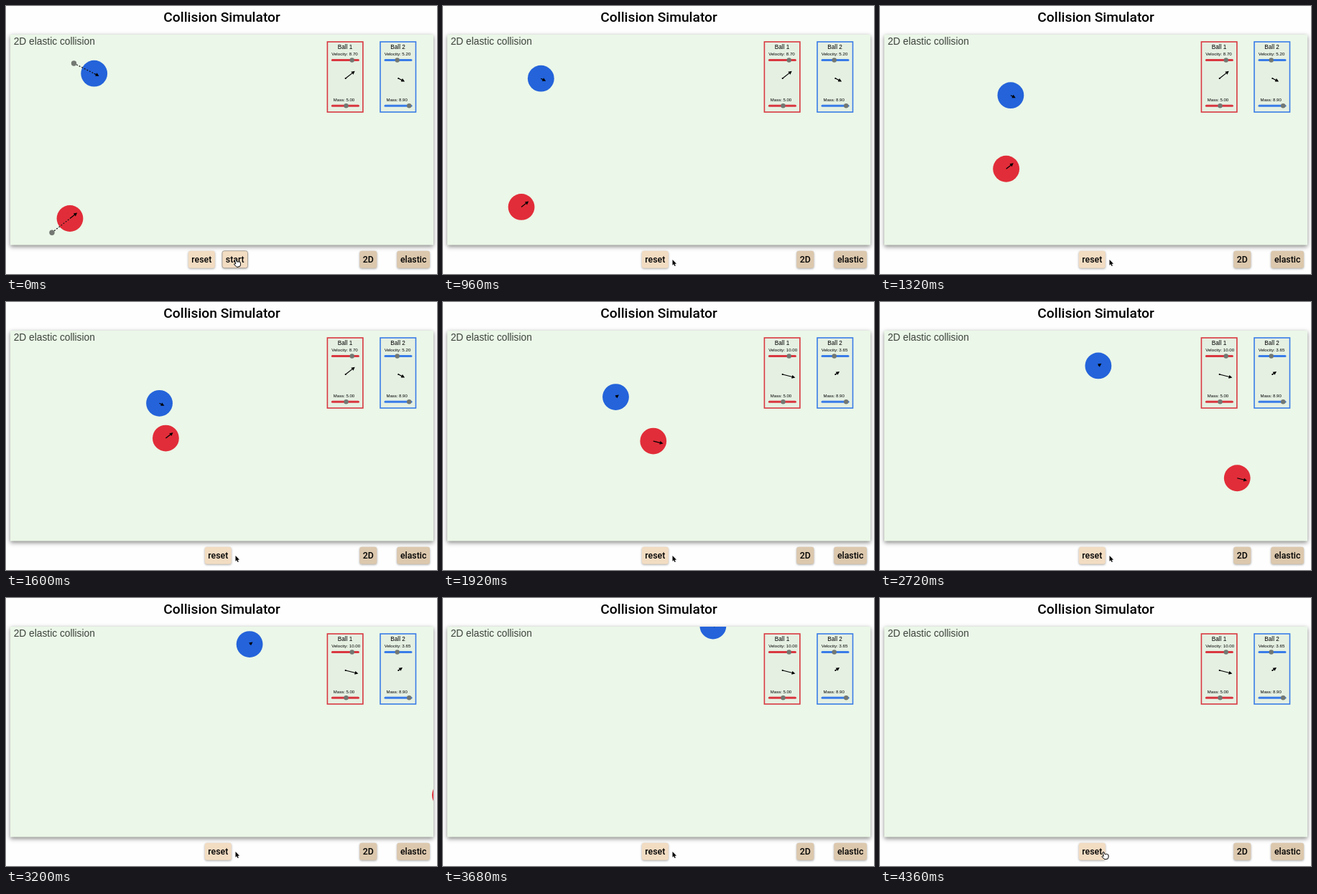
An HTML page with a canvas that plays this animation: 600 px wide and 374 px high, repeating every 4400 ms.

```html
<!DOCTYPE html>
<html lang="en">
<head>
<meta charset="utf-8">
<title>Collision Simulator</title>
<style>
html, body { margin: 0; width: 100%; height: 100%; overflow: hidden; background: #fefefe; }
canvas { display: block; }
</style>
</head>
<body>
<canvas id="view" width="600" height="374"></canvas>
<script>
const ctx = document.getElementById('view').getContext('2d');
const LOOP = 4400, START = 853, HIT = 1680, R = 18.4;
const ARIAL = '"Liberation Sans", Arial, sans-serif';
const ROBOTO = 'Roboto, sans-serif';
const RED = '#e12d39', BLUE = '#2463da', GRAY = '#737873';

// time, red x, red y, blue x, blue y
const path = [
  [START, 89, 296.5, 122.7, 94.2],
  [960, 108.9, 280.6, 136.2, 101.1],
  [1320, 175.5, 227.4, 181.8, 124.6],
  [HIT, 235.6, 179.6, 222.5, 146],
  [1920, 292.5, 194, 240.4, 132.6],
  [2720, 497, 245.7, 303.8, 89],
  [3200, 611.2, 275, 339, 64.6],
  [LOOP, 897, 347, 431, 1]
];

function positions(t) {
  if (t <= START) return path[0].slice(1);
  const i = path.findIndex(p => p[0] > t);
  const a = path[i - 1], b = path[i];
  const k = (t - a[0]) / (b[0] - a[0]);
  return a.slice(1).map((v, j) => v + (b[j + 1] - v) * k);
}

function text(s, x, y, font, color = '#000', align = 'center') {
  ctx.font = font;
  ctx.fillStyle = color;
  ctx.textAlign = align;
  ctx.fillText(s, x, y);
}

function disc(x, y, r, color) {
  ctx.fillStyle = color;
  ctx.beginPath();
  ctx.arc(x, y, r, 0, 7);
  ctx.fill();
}

function line(x1, y1, x2, y2, color, width, dash = []) {
  ctx.strokeStyle = color;
  ctx.lineWidth = width;
  ctx.setLineDash(dash);
  ctx.beginPath();
  ctx.moveTo(x1, y1);
  ctx.lineTo(x2, y2);
  ctx.stroke();
  ctx.setLineDash([]);
}

function shadow(color, blur, y) {
  ctx.shadowColor = color;
  ctx.shadowBlur = blur;
  ctx.shadowOffsetY = y;
}

function arrow(x, y, [dx, dy], scale) {
  const len = Math.hypot(dx, dy) * scale;
  ctx.save();
  ctx.translate(x, y);
  ctx.rotate(Math.atan2(dy, dx));
  line(0, 0, len - 3, 0, '#000', 1.2);
  ctx.fillStyle = '#000';
  ctx.beginPath();
  ctx.moveTo(len, 0);
  ctx.lineTo(len - 4.8, -2.5);
  ctx.lineTo(len - 4.8, 2.5);
  ctx.fill();
  ctx.restore();
}

function button(label, x, w, color, focus) {
  ctx.save();
  shadow('rgba(0,0,0,.35)', 3, 1);
  ctx.fillStyle = color;
  ctx.beginPath();
  ctx.roundRect(x, 341.7, w, 24, 3);
  ctx.fill();
  ctx.restore();
  if (focus) {
    ctx.strokeStyle = '#aaa39a';
    ctx.lineWidth = 1;
    ctx.stroke();
  }
  text(label, x + w / 2, 358, '500 12.3px ' + ROBOTO);
}

function slider(x, y, knob, color) {
  ctx.lineCap = 'round';
  line(x + 7, y, x + 43, y, color, 3);
  ctx.lineCap = 'butt';
  disc(knob, y, 3.2, GRAY);
}

function panel(n, x, color, speed, mass, v, speedKnob, massKnob) {
  ctx.fillStyle = '#e5f0e2';
  ctx.fillRect(x, 50, 49.5, 98);
  ctx.strokeStyle = color;
  ctx.lineWidth = 1.6;
  ctx.strokeRect(x, 50, 49.5, 98);
  text('Ball ' + n, x + 24.6, 60, '8.2px ' + ARIAL);
  text('Velocity: ' + speed, x + 5.8, 69.3, '6.15px ' + ARIAL, '#000', 'left');
  text('Mass: ' + mass, x + 8.4, 133, '6px ' + ARIAL, '#000', 'left');
  slider(x, 75.5, speedKnob, color);
  slider(x, 139.2, massKnob, color);
  disc(x + 25.3, 101, 1.1, '#000');
  arrow(x + 25.3, 101, v, 1);
}

function ball(x, y, color, v, knob) {
  disc(x, y, R, color);
  if (knob) {
    line(knob[0], knob[1], x, y, '#111', 1.2, [2, 2]);
    disc(knob[0], knob[1], 3.7, GRAY);
  }
  arrow(x, y, v, .78);
}

function pointer(x, y, hand) {
  ctx.save();
  ctx.translate(x, y);
  ctx.lineJoin = 'round';
  const shape = new Path2D(hand
    ? 'M-1 .5Q0-.8 1 .5L2 3.3Q3 2.5 3.7 3.2Q4.8 2.5 5.4 3.3Q6.6 3 6.8 4.2L7 7L6 9.5L2 10.2L-1.8 7Q-2.2 5.5-.5 5.6L.4 6Z'
    : 'M0 0V7.8L1.8 6.2L3 9L4.3 8.4L3.1 5.7H5.5Z');
  ctx.fillStyle = hand ? '#fff' : '#000';
  ctx.strokeStyle = hand ? '#111' : '#fff';
  ctx.lineWidth = hand ? .9 : 1.2;
  ctx.stroke(shape);
  ctx.fill(shape);
  if (hand) ctx.stroke(shape);
  ctx.restore();
}

function draw(t) {
  const idle = t < START, hit = t >= HIT;
  const [rx, ry, bx, by] = positions(t);
  const redV = hit ? [17.7, 4.5] : [13, -10.2];
  const blueV = hit ? [5.7, -4] : [8.8, 4.5];

  ctx.fillStyle = '#fefefe';
  ctx.fillRect(0, 0, 600, 374);
  text('Collision Simulator', 300.5, 22, '500 19.2px ' + ROBOTO);

  ctx.save();
  shadow('rgba(0,0,0,.45)', 6, 2);
  ctx.fillStyle = '#ebf7e8';
  ctx.fillRect(6, 40, 589, 293.5);
  ctx.restore();
  text('2D elastic collision', 10.7, 54.3, '13.75px ' + ARIAL, '#3c423b', 'left');

  panel(1, 447.4, '#d93740', hit ? '10.00' : '8.70', '5.00', redV, 481.7, 473.5);
  panel(2, 521, '#397ce8', hit ? '3.65' : '5.20', '8.90', blueV, 544.7, 561.2);

  ctx.save();
  ctx.beginPath();
  ctx.rect(6, 40, 589, 293.5);
  ctx.clip();
  ball(rx, ry, RED, redV, idle && [64, 316.3]);
  ball(bx, by, BLUE, blueV, idle && [94.5, 80]);
  ctx.restore();

  if (idle) {
    button('reset', 253.8, 37, '#f2dcc2');
    button('start', 301, 35.5, '#f2dcc2', true);
  } else {
    button('reset', 276.8, 37, '#f2dcc2');
  }
  button('2D', 492.3, 24, '#dcc8ad');
  button('elastic', 544.3, 45.7, '#dcc8ad');

  const k = Math.min(1, Math.max(0, (t - 4000) / 240));
  const x = 319.5 - 8.5 * k;
  pointer(x, 354 + .5 * k, idle || x < 314);
}

function frame(now) {
  draw(now % LOOP);
  requestAnimationFrame(frame);
}
requestAnimationFrame(frame);
</script>
</body>
</html>
```
